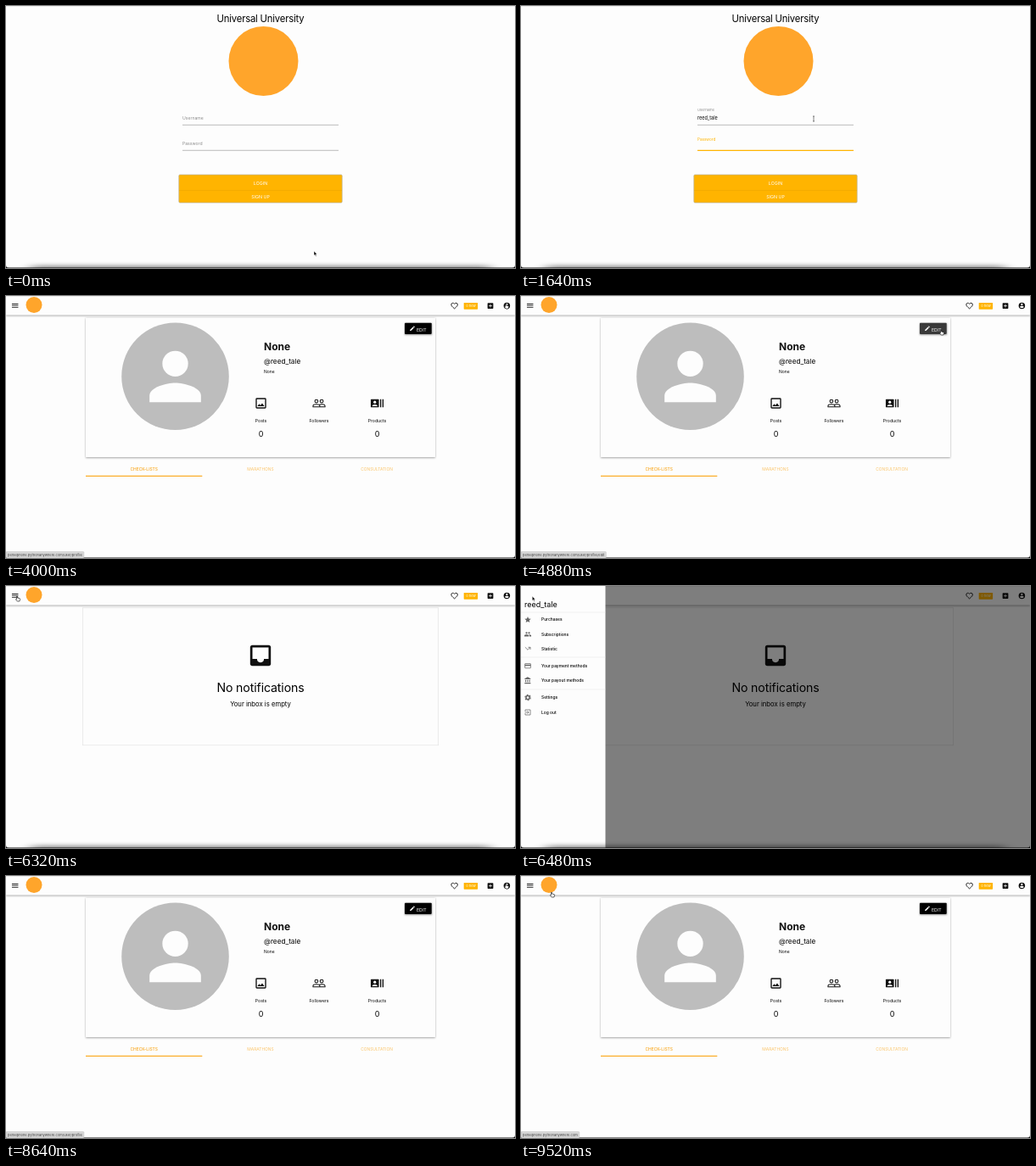
An HTML page for the animation above (9640 ms loop, 600 by 309 pixels).

```html
<!DOCTYPE html>
<html lang="en">
<head>
<meta charset="utf-8">
<title>University portal</title>
<style>
  html, body { margin: 0; width: 100%; height: 100%; overflow: hidden; background: #fdfdfd; }
  svg { display: block; }
  text { font-family: Inter, "Open Sans", sans-serif; white-space: pre; }
  .line { stroke: #9e9e9e; stroke-width: .7; }
</style>
</head>
<body>
<svg id="stage" width="600" height="309" viewBox="0 0 600 309">
  <defs>
    <filter id="soft" x="-10%" y="-20%" width="120%" height="150%"><feGaussianBlur stdDeviation="1"/></filter>
    <filter id="dock" filterUnits="userSpaceOnUse" x="0" y="285" width="600" height="40"><feGaussianBlur stdDeviation="8 2.4"/></filter>
    <symbol id="menu" viewBox="0 0 24 24"><path d="M3 18h18v-2H3zM3 13h18v-2H3zM3 6v2h18V6z"/></symbol>
    <symbol id="heart" viewBox="0 0 24 24"><path d="M12 20C6 14.500 3 12 3 8.500C3 3.500 9.500 2.500 12 6.500C14.500 2.500 21 3.500 21 8.500C21 12 18 14.500 12 20z" fill="none" stroke="currentColor" stroke-width="2.200"/></symbol>
    <symbol id="add" viewBox="0 0 24 24"><rect x="3" y="3" width="18" height="18" rx="2"/><path d="M7 12h10M12 7v10" stroke="#fff" stroke-width="2"/></symbol>
    <symbol id="account" viewBox="0 0 24 24"><circle cx="12" cy="12" r="10"/><circle cx="12" cy="8" r="3" fill="#fff"/><path d="M6 16c0-4 12-4 12 0a7.200 7.200 0 0 1-12 0z" fill="#fff"/></symbol>
    <symbol id="person" viewBox="0 0 24 24"><circle cx="12" cy="8" r="4"/><path d="M12 14c-2.670 0-8 1.340-8 4v2h16v-2c0-2.660-5.330-4-8-4z"/></symbol>
    <symbol id="image" viewBox="0 0 24 24"><rect x="4" y="4" width="16" height="16" rx="1" fill="none" stroke="currentColor" stroke-width="2"/><path d="M14.140 11.860l-3 3.870L9 13.140 6 17h12z"/></symbol>
    <symbol id="pair" viewBox="0 0 24 24"><g fill="none" stroke="currentColor" stroke-width="1.500"><circle cx="7.500" cy="8.500" r="2.750"/><circle cx="16.500" cy="8.500" r="2.750"/><path d="M1.750 18.250v-2c0-3.300 11.500-3.300 11.500 0v2zM13 14.300c3-1.200 9.250-.5 9.250 2v2h-9"/></g></symbol>
    <symbol id="cards" viewBox="0 0 24 24"><path d="M21 5h2v14h-2zM17 5h2v14h-2z"/><rect x="1" y="5" width="14" height="14" rx="1"/><circle cx="8" cy="10" r="2.250" fill="#fff"/><path d="M3.500 17c0-4 9-4 9 0z" fill="#fff"/></symbol>
    <symbol id="pencil" viewBox="0 0 24 24"><path d="M3 17.250V21h3.750L17.800 9.900 14.100 6.200zM20.700 7a1 1 0 0 0 0-1.400l-2.300-2.300a1 1 0 0 0-1.400 0l-1.900 1.800 3.800 3.800z"/></symbol>
    <symbol id="tray" viewBox="0 0 24 24"><rect x="3" y="3" width="18" height="18" rx="2"/><path d="M5 5h14v10h-4a3 3 0 0 1-6 0H5z" fill="#fdfdfd"/></symbol>
    <symbol id="star" viewBox="0 0 24 24"><path d="M12 17.270L18.180 21l-1.640-7.030L22 9.240l-7.190-.61L12 2 9.190 8.630 2 9.240l5.460 4.730L5.820 21z"/></symbol>
    <symbol id="people" viewBox="0 0 24 24"><circle cx="8" cy="8" r="3"/><circle cx="16" cy="8" r="3"/><path d="M1 19v-2.500c0-4.500 14-4.500 14 0V19zM15 13c3 0 8 1 8 3.500V19h-6c0-3 0-4-2-6z"/></symbol>
    <symbol id="trend" viewBox="0 0 24 24"><path d="M3.700 7.700L12 16l8-8M13 8h7v7" fill="none" stroke="currentColor" stroke-width="2"/></symbol>
    <symbol id="card" viewBox="0 0 24 24"><rect x="3" y="5" width="18" height="14" rx="1" fill="none" stroke="currentColor" stroke-width="2"/><path d="M3 8h18v4H3z"/></symbol>
    <symbol id="bank" viewBox="0 0 24 24"><path d="M4 10h3v7H4zM10 10h3v7h-3zM16 10h3v7h-3zM2 19h19v3H2zM11.500 1L2 6v2h19V6z"/></symbol>
    <symbol id="gear" viewBox="0 0 24 24"><g fill="none" stroke="currentColor"><circle cx="12" cy="12" r="5.500" stroke-width="4"/><circle cx="12" cy="12" r="8.500" stroke-width="3" stroke-dasharray="4.900 4"/></g></symbol>
    <symbol id="exit" viewBox="0 0 24 24"><path d="M4 9V4h16v16H4v-5M3 12h12M11 8l4 4-4 4" fill="none" stroke="currentColor" stroke-width="2"/></symbol>
  </defs>
  <rect width="600" height="309" fill="#fdfdfd"/>
  <g id="login"></g>
  <g id="profile"></g>
  <g id="inbox"></g>
  <g id="subs"></g>
  <g id="nav"></g>
  <path d="M0 .3H600" stroke="#dcdcdc" stroke-width=".6"/>
  <g id="drawer">
    <rect id="shade" width="600" height="309"/>
    <g id="panel"></g>
  </g>
  <rect id="glow" x="30" y="306" width="540" height="9" fill="#000" opacity=".4" filter="url(#dock)"/>
  <path d="M0 308.600H600" stroke="#000" stroke-width=".8" opacity=".65"/>
  <path d="M0 305.500Q0 309 3.500 309H0zM600 305.500Q600 309 596.500 309H600z"/>
  <g id="status">
    <rect y="301.500" height="7.500" rx="1" fill="#d6d6d6" stroke="#bbb" stroke-width=".4"/>
    <text x="2" y="306.700" font-size="4" fill="#444"></text>
  </g>
  <g id="pointer" stroke-linejoin="round">
    <path id="arrow" d="M0 0V5.200L1.200 4.200 2.100 6.200 3 5.800 2.100 3.900H3.700z" stroke="#fff" stroke-width=".5"/>
    <path id="hand" d="M-.5 .4Q0-.4.500.4V2L3.300 2.700Q3.800 3 3.500 4.200L2.900 6H.2L-1.600 3.800Q-1.400 3-.5 3.500z" fill="#fff" stroke="#000" stroke-width=".6"/>
    <path id="beam" d="M-1-3H1M0-3V3M-1 3H1" stroke="#333" stroke-width=".6"/>
  </g>
</svg>
<script>
const LOOP = 9640, AMBER = '#ffb400', USER = 'reed_tale', HOST = 'persephone.pythonanywhere.com';
const $ = id => document.getElementById(id);

const text = (x, y, size, str, extra = '') => `<text x="${x}" y="${y}" font-size="${size}" ${extra}>${str}</text>`;
const mid = (x, y, size, str, extra = '') => text(x, y, size, str, 'text-anchor="middle" ' + extra);
const rect = (x, y, w, h, fill, extra = '') => `<rect x="${x}" y="${y}" width="${w}" height="${h}" fill="${fill}" ${extra}/>`;
const rule = (x1, x2, y, color, w = .6) => `<path d="M${x1} ${y}H${x2}" stroke="${color}" stroke-width="${w}"/>`;
const icon = (id, x, y, size, color = '#111') =>
  `<use href="#${id}" x="${x - size / 2}" y="${y - size / 2}" width="${size}" height="${size}" fill="${color}" color="${color}"/>`;
const logo = (x, y, r) => `<circle cx="${x}" cy="${y}" r="${r}" fill="#ffa52b"/>`;

const field = (id, label, y) =>
  `<text id="${id}Label" x="208">${label}</text><path id="${id}Line" class="line" d="M208 ${y}H392"/>`;

$('login').innerHTML =
  mid(300, 19.2, 11.3, 'Universal University', 'letter-spacing="-.2"') + logo(303.5, 65, 41) +
  field('user', 'Username', 140.3) + field('pass', 'Password', 170.3) +
  text(208, 134.3, 5.5, '', 'id="typed"') + '<g id="dots"></g>' +
  rect(203.8, 199, 192.4, 33, AMBER, 'rx="1.2" stroke="#b9b49c" stroke-width=".7"') +
  rect(204, 199.3, 192, 18, '#e9a300', 'id="loginHover"') +
  rule(204, 396, 217.5, '#eda800') +
  mid(300, 211, 5.3, 'LOGIN', 'fill="#fff"') + mid(300, 227, 5.3, 'SIGN UP', 'fill="#fff"');

$('nav').innerHTML =
  rect(0, 1, 600, 22.3, '#777', 'filter="url(#soft)" opacity=".7"') + rect(0, 0, 600, 22.5, '#fdfdfd') +
  icon('menu', 10.7, 11.6, 10) + logo(33, 10.5, 9.5) +
  icon('heart', 528.6, 11.6, 10) + rect(539.7, 8, 16.4, 7.7, AMBER, 'rx=".6"') +
  mid(548, 13.3, 4, '0 new', 'fill="#fff"') + icon('add', 571, 11.6, 9) + icon('account', 590.4, 11.4, 9);

const stat = (x, id, label, count) =>
  icon(id, x, 126.5, 16.5) + mid(x, 149, 5.1, label) + mid(x, 165.6, 9, count);

$('profile').innerHTML =
  rect(94, 26.5, 412, 164.5, '#888', 'filter="url(#soft)" opacity=".75"') + rect(94, 26, 412, 164, '#fdfdfd') +
  '<circle cx="199.5" cy="94.7" r="63.3" fill="#bdbdbd"/>' + icon('person', 199.5, 95, 91, '#fdfdfd') +
  text(304, 64, 12, 'None', 'font-weight="700" fill="#111"') + text(304, 80.3, 8.2, '@' + USER) + text(304, 91, 5, 'None') +
  stat(300.5, 'image', 'Posts', 0) + stat(369, 'pair', 'Followers', '') + stat(437.5, 'cards', 'Products', 0) +
  rect(470, 32.5, 32, 13.3, '#888', 'filter="url(#soft)"') +
  rect(470, 31.7, 31.7, 13.2, '#000', 'id="edit" rx=".8"') +
  icon('pencil', 479, 38.3, 7.5, '#fff') + text(484, 41.5, 5.2, 'EDIT', 'fill="#fff"') +
  mid(162.7, 206.4, 4.9, 'CHECK-LISTS', 'fill="#f9a61a" font-weight="500"') +
  mid(300, 206.4, 4.9, 'MARATHONS', 'fill="#fbc56b"') + mid(437, 206.4, 4.9, 'CONSULTATION', 'fill="#fbc56b"') +
  rule(94, 231.3, 212.3, '#fbae2b', 1.2);

$('inbox').innerHTML =
  rect(90.3, 25.8, 419.4, 162, 'none', 'stroke="#e0e0e0" stroke-width=".6"') + icon('tray', 300, 82, 32.5) +
  mid(300, 125, 14.1, 'No notifications', 'letter-spacing="-.1"') + mid(300, 142.3, 7.7, 'Your inbox is empty');

$('subs').innerHTML =
  text(90, 42.5, 7.9, 'My subscriptions:') + text(90, 55.2, 5.15, 'People I am following') + rule(90, 510, 68.2, '#dcdcdc');

const items = [
  ['star', 'Purchases', 39.7], ['people', 'Subscriptions', 56.8], ['trend', 'Statistic', 73.8],
  ['card', 'Your payment methods', 94.2], ['bank', 'Your payout methods', 111.4],
  ['gear', 'Settings', 131.6], ['exit', 'Log out', 149]
];
$('panel').innerHTML =
  rect(0, 0, 99.5, 309, '#fdfdfd') + rect(0, 48.3, 99.5, 17, '#efefef', 'id="itemHover"') + text(4, 25, 9, USER) +
  [31, 84, 122].map(y => rule(0, 99.5, y, '#e0e0e0', .5)).join('') +
  items.map(([id, label, y]) => icon(id, 8, y, 9, '#666') + text(24, y + 1.7, 4.9, label, 'font-weight="500"')).join('');

// Pointer stops: time, x, y
const path = [
  [40, 363, 289], [720, 345, 133], [1960, 345, 133], [2440, 368, 203], [2600, 368, 203], [3080, 366.5, 151],
  [3240, 372, 143], [3520, 372, 143], [3960, 589, 9], [4160, 589, 9], [4800, 495, 40], [5150, 495, 40],
  [5480, 548, 9], [5720, 548, 9], [6280, 13, 12], [6680, 13.5, 12], [7200, 56, 55], [7660, 56, 55],
  [8440, 589, 9], [8680, 589, 9], [9480, 36, 19]
];
const hands = [[2400, 2640], [3900, 4220], [4740, 5190], [5420, 5760], [6220, 6420], [6980, 7760], [8380, 8740], [9420, LOOP]];
const links = [
  [3900, 4220, '/user/profile'], [4740, 5200, '/user/profile/edit'], [6980, 7760, '/sub/following_list/'],
  [8380, 8740, '/user/profile'], [9420, LOOP, '']
];
// Page starts
const pages = [[0, 'login'], [3190, 'profile'], [5710, 'inbox'], [7630, 'subs'], [8640, 'profile']];

const within = (t, [a, b]) => t >= a && t < b;
const ramp = (t, a, b) => Math.min(1, Math.max(0, (t - a) / (b - a)));
const ease = p => p * p * (3 - 2 * p);
const show = (id, on) => { $(id).style.display = on ? '' : 'none'; };

function pointerAt(t) {
  const i = path.findIndex(p => p[0] > t);
  if (i < 0) return path[path.length - 1].slice(1);
  if (i === 0) return path[0].slice(1);
  const [a, x, y] = path[i - 1], [b, u, v] = path[i], k = ease(ramp(t, a, b));
  return [x + (u - x) * k, y + (v - y) * k];
}

function drawField(id, t, start, end, baseline) {
  const k = ease(ramp(t, start, start + 160)), on = within(t, [start, end]);
  const label = $(id + 'Label'), line = $(id + 'Line');
  label.setAttribute('y', baseline - 10.2 * k);
  label.setAttribute('font-size', 5.1 - k);
  label.setAttribute('fill', on ? AMBER : '#8c8c8c');
  line.style.stroke = on ? AMBER : '';
  line.style.strokeWidth = on ? 1.2 : '';
}

function drawStatus(t) {
  const link = links.find(l => within(t, l));
  show('status', link);
  show('glow', !link);
  if (!link) return;
  const [box, label] = $('status').children;
  label.textContent = HOST + link[2];
  box.setAttribute('width', label.getComputedTextLength() + 4);
}

function draw(t) {
  const page = pages.filter(p => p[0] <= t).pop()[1];
  for (const id of ['login', 'profile', 'inbox', 'subs']) show(id, id === page);
  show('nav', page !== 'login');

  drawField('user', t, 740, 1560, 134.3);
  drawField('pass', t, 1560, 2520, 164.3);
  $('typed').textContent = USER.slice(0, Math.floor(ramp(t, 860, 1390) * USER.length));
  const count = Math.floor(ramp(t, 1620, 1960) * 4);
  $('dots').innerHTML = Array.from({ length: count }, (_, i) => `<circle cx="${209.2 + i * 2.6}" cy="162.600" r=".9"/>`).join('');
  show('loginHover', within(t, [2400, 2640]));
  $('edit').setAttribute('fill', within(t, [4740, 5190]) ? '#3a3a3a' : '#000');

  const open = page === 'inbox' ? ease(ramp(t, 6350, 6470)) : 0;
  show('drawer', open > 0);
  $('shade').setAttribute('opacity', open * .5);
  $('panel').setAttribute('transform', `translate(${(open - 1) * 100})`);
  show('itemHover', t > 6980);
  drawStatus(t);

  const hand = hands.some(h => within(t, h)), beam = within(t, [700, 2080]);
  show('hand', hand);
  show('beam', beam);
  show('arrow', !hand && !beam);
  $('pointer').setAttribute('transform', `translate(${pointerAt(t)})`);
}

const start = performance.now();
function tick() {
  draw((performance.now() - start) % LOOP);
  requestAnimationFrame(tick);
}
tick();
</script>
</body>
</html>
```
